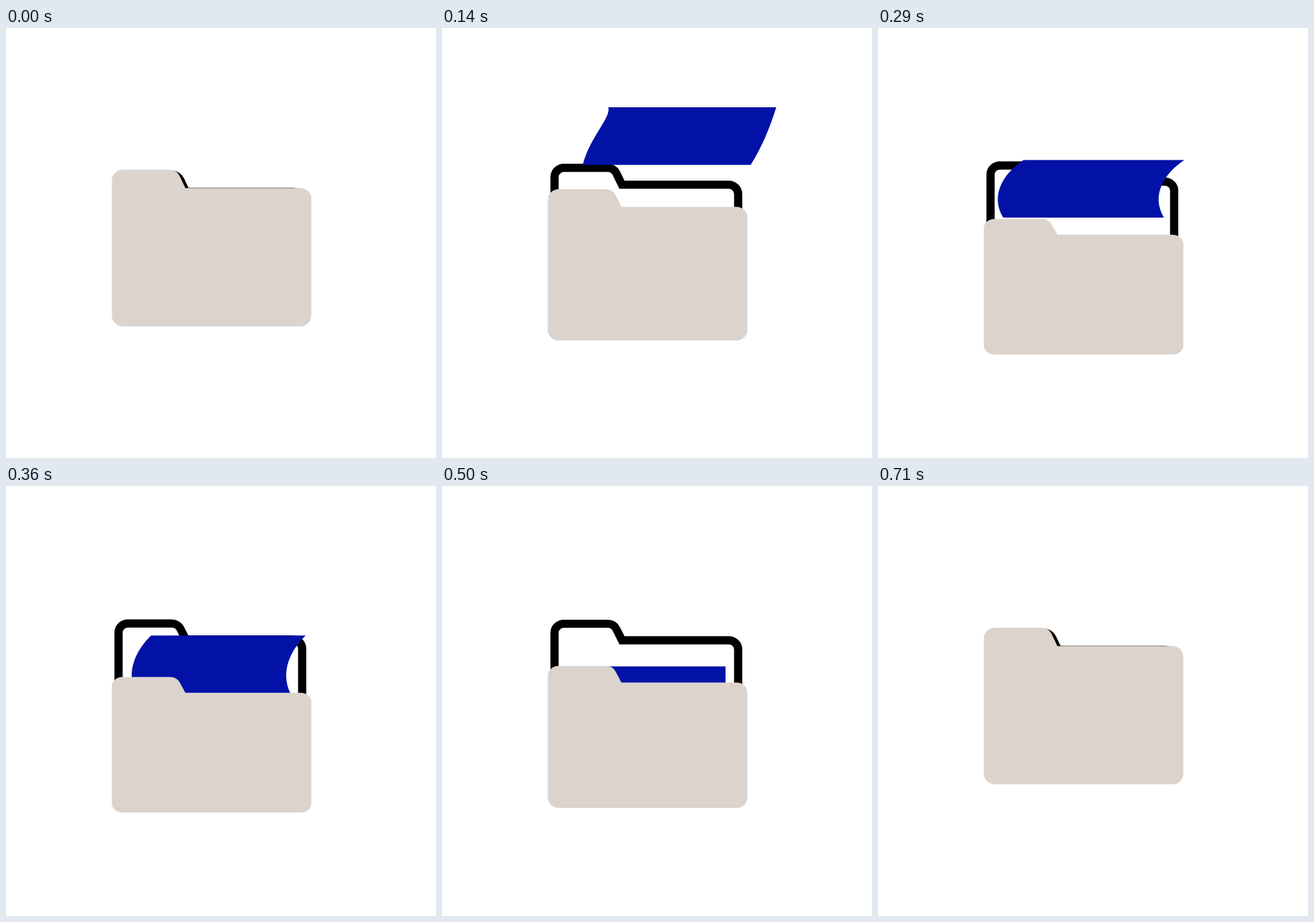
An HTML page with a canvas that plays this animation: 640 by 640 pixels, repeating every 1780 ms.

```html
<!DOCTYPE html>
<html lang="en">
<head>
<meta charset="utf-8">
<title>Folder</title>
<style>
  html, body { margin: 0; width: 100%; height: 100%; overflow: hidden; background: #fff; }
  canvas { display: block; width: 640px; height: 640px; }
</style>
</head>
<body>
<canvas id="stage" width="640" height="640"></canvas>
<script>
const ctx = document.getElementById('stage').getContext('2d');
const LOOP = 1780;
const CLAY = '#dcd3cd', INK = '#000', BLUE = '#0212a6';
const HINGE = 444;
const SHEET_H = 85.7;

// Key points of the sheet's top right corner.
const KEYS = [
  { t: 70, x: 560, y: 80 },
  { t: 140, x: 497.5, y: 118 },
  { t: 210, x: 467.5, y: 167 },
  { t: 360, x: 446, y: 222.5 },
  { t: 500, x: 422, y: 268.5 }
];

const BACK = { l: 167.5, r: 440.8, top: 218.2, notch: 243.8, foot: 267.8, bottom: 425, radius: 14 };
const FRONT = { l: 157.5, r: 454.5, top: 211, notch: 238.2, foot: 267, bottom: HINGE, radius: 16 };

const clamp = v => Math.max(0, Math.min(1, v));
const rad = deg => deg * Math.PI / 180;
const openness = t => Math.min(clamp(t / 280), clamp((675 - t) / 210));

// The picture advances in ten even steps, rounded to 10 ms, then rests.
function stepTime(t) {
  let k = 10;
  const at = n => Math.round(n * 7.13) * 10;
  while (at(k) > t) k--;
  return at(k);
}

function cornerAt(t) {
  const i = Math.max(1, KEYS.findIndex(k => k.t >= t));
  const b = t > 500 ? KEYS[KEYS.length - 1] : KEYS[i];
  const a = KEYS[i - 1];
  const k = clamp((t - a.t) / (b.t - a.t));
  return t > 500 ? b : { x: a.x + (b.x - a.x) * k, y: a.y + (b.y - a.y) * k };
}

// Folder outline, tilted about its bottom edge and shifted vertically.
function folderPath(f, angle, shift) {
  const squash = Math.cos(rad(angle));
  const apex = f.foot - 0.48 * (f.notch - f.top);
  const R = f.radius;
  ctx.setTransform(1, 0, 0, squash, 0, HINGE * (1 - squash) + shift);
  ctx.beginPath();
  ctx.moveTo(f.l, f.bottom - R);
  ctx.arcTo(f.l, f.top, apex, f.top, R);
  ctx.arcTo(apex, f.top, f.foot, f.notch, R);
  ctx.lineTo(f.foot, f.notch);
  ctx.arcTo(f.r, f.notch, f.r, f.bottom, R);
  ctx.arcTo(f.r, f.bottom, f.l, f.bottom, R);
  ctx.arcTo(f.l, f.bottom, f.l, f.top, R);
  ctx.closePath();
  ctx.resetTransform();
}

function drawBack(p) {
  folderPath(BACK, 20 * p, -27.2 * p);
  ctx.lineWidth = 12.2;
  ctx.strokeStyle = INK;
  ctx.stroke();
}

function drawFront(p) {
  folderPath(FRONT, 30 * p, 42 * p);
  ctx.fillStyle = CLAY;
  ctx.fill();
}

function drawSheet(t) {
  if (t < 70 || t >= 570) return;
  const { x, y } = cornerAt(t);
  const lean = -38 * clamp((500 - t) / 290) ** 0.7;
  const bow = lean + 52 * (1 - clamp((t - 70) / 140) ** 2.5);
  const twist = 14 * clamp(1 - Math.abs(t - 140) / 70);
  const left = x - 250 + 20 * clamp((t - 210) / 150);

  // Control points of a side edge, relative to its upper end.
  const x1 = lean / 3 + bow * 0.65, y1 = SHEET_H / 3 + bow * 0.3;
  const x2 = lean * 2 / 3 + bow, y2 = SHEET_H * 2 / 3 + bow * 0.15;

  ctx.beginPath();
  ctx.moveTo(left, y);
  ctx.bezierCurveTo(left + x1 + twist, y + y1 - twist, left + x2 - twist / 2, y + y2 - twist,
    left + lean, y + SHEET_H);
  ctx.lineTo(x + lean, y + SHEET_H);
  ctx.bezierCurveTo(x + x2, y + y2, x + x1, y + y1, x, y);
  ctx.closePath();
  ctx.fillStyle = BLUE;
  ctx.fill();
}

function draw(t) {
  const p = openness(t);
  ctx.fillStyle = '#fff';
  ctx.fillRect(0, 0, 640, 640);
  drawBack(p);
  drawSheet(t);
  drawFront(p);
}

const start = performance.now();
function tick() {
  draw(stepTime((performance.now() - start) % LOOP));
  requestAnimationFrame(tick);
}
draw(0);
requestAnimationFrame(tick);
</script>
</body>
</html>
```
